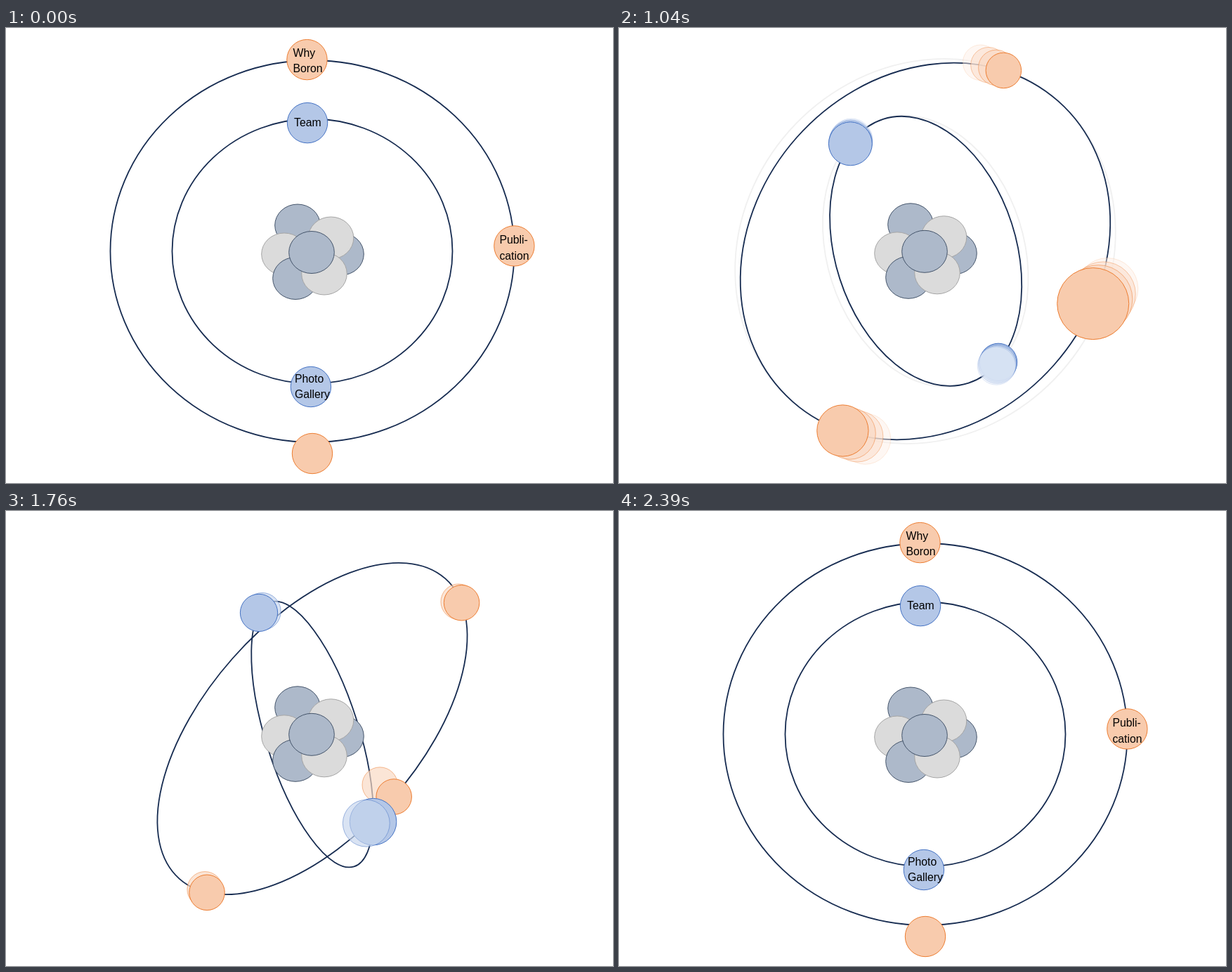
An HTML page with a canvas that plays this animation: 864 by 648 pixels, repeating every 8000 ms.

```html
<!DOCTYPE html>
<html lang="en">
<head>
<meta charset="utf-8">
<title>Atom menu</title>
<style>
  html, body { margin: 0; height: 100%; overflow: hidden; background: #fff; }
  canvas { display: block; width: 100vw; height: 100vh; }
</style>
</head>
<body>
<canvas id="stage" width="864" height="648"></canvas>
<script>
const ctx = document.getElementById('stage').getContext('2d');
const LOOP = 8000, START = 500, STEP = 90, LAST = 21, RAD = Math.PI / 180;
const ORANGE = ['#f8cbad', '#ed7d31'], BLUE = ['#b4c7e7', '#4472c4'];
const DARK = ['#adb9ca', '#44546a'], LIGHT = ['#dbdbdb', '#a5a5a5'];
const CX = 436, CY = 318, BALL = 28.7;

// Each ring flips about its long axis while its balls spin along it.
// turns: [step, degrees]; base: resting angle; nudge: resting offset in y
const outer = {
  rx: 287.5, ry: 272, axis: -48.5, bend: 0, shift: 68, rise: 8,
  spin: 42, pinch: 20, gain: 1.9, paint: ORANGE,
  turns: [[0, 0], [5, 18], [6, 26], [8, 70], [9, 84], [10, 220], [11, 227], [16, 355], [LAST, 360]],
  balls: [
    { base: -91.5, nudge: -1, lines: ['Why', 'Boron'], dx: -20, dy: -4.5 },
    { base: 90, nudge: 16, lines: [] },
    { base: -1.6, nudge: 0, lines: ['Publi-', 'cation'], dx: -21, dy: -3 }
  ]
};
const inner = {
  rx: 199.5, ry: 188.5, axis: 72.5, bend: -10, shift: 16, rise: 0,
  spin: -47, pinch: -17, gain: .25, paint: BLUE,
  turns: [[0, 0], [5, 42], [6, 47], [8, 62], [9, 81.5], [10, 226], [11, 233], [16, 329], [LAST, 360]],
  balls: [
    { base: -92, nudge: 5.5, lines: ['Team'], dx: -19, dy: 5 },
    { base: 90.6, nudge: 4.5, lines: ['Photo', 'Gallery'], dx: -23, dy: -6 }
  ]
};
const rings = [outer, inner];

const nucleus = [
  [477, 322, DARK], [415, 281, DARK], [396, 322, LIGHT], [462.5, 299, LIGHT],
  [412, 356.5, DARK], [453, 350, LIGHT], [435, 319.5, DARK]
];

function turnAt(turns, k) {
  k = Math.min(LAST, Math.max(0, k));
  const i = Math.max(1, turns.findIndex(([step]) => step >= k));
  const [k0, a] = turns[i - 1], [k1, b] = turns[i];
  return (a + (b - a) * (k - k0) / (k1 - k0)) * RAD;
}

// 1 at rest, 0 in motion
const restAt = k => Math.min(1, Math.max(0, 1 - .2 * (k + 1), 1 - .2 * (LAST - k)));

function ringPose(ring, k) {
  const turn = turnAt(ring.turns, k), sin = Math.sin(turn), cos = Math.cos(turn);
  const swing = Math.min(1, 10 * Math.abs(sin));
  const lean = Math.max(0, sin) ** 10;
  const tilt = (ring.axis * swing + ring.bend * lean) * RAD;
  return {
    x: CX + ring.shift * lean * Math.sin(tilt),
    y: CY - ring.shift * lean * Math.cos(tilt) - (sin < 0 ? ring.rise * swing : 0),
    a: ring.rx - 2 * swing, b: ring.ry * cos, tilt, sin, lean
  };
}

function ballPose(ring, ball, k) {
  const { x, y, a, b, tilt, sin } = ringPose(ring, k);
  let angle = ball.base * RAD - tilt + ring.spin * RAD * Math.min(1, 1.2 * Math.abs(sin));
  angle += ring.pinch * RAD * Math.cos(angle) * Math.max(0, -sin);
  const u = a * Math.cos(angle), v = b * Math.sin(angle);
  const depth = Math.sin(angle) * sin;
  return {
    x: x + u * Math.cos(tilt) - v * Math.sin(tilt),
    y: y + u * Math.sin(tilt) + v * Math.cos(tilt) + ball.nudge * Math.min(1, restAt(k) * 1.25),
    r: BALL * Math.max(.88, 1 + ring.gain * depth),
    depth
  };
}

function oval(x, y, rx, ry, [fill, line]) {
  ctx.beginPath();
  ctx.ellipse(x, y, rx, ry, 0, 0, 2 * Math.PI);
  ctx.fillStyle = fill;
  ctx.fill();
  ctx.strokeStyle = line;
  ctx.lineWidth = 1;
  ctx.stroke();
}

function strokeRing({ x, y, a, b, tilt }, color, width, end = 2 * Math.PI) {
  ctx.beginPath();
  ctx.ellipse(x, y, a, Math.abs(b), tilt, 0, end);
  ctx.strokeStyle = color;
  ctx.lineWidth = width;
  ctx.stroke();
}

function drawRings(k, moving) {
  const trail = (ago, color) =>
    rings.forEach(ring => strokeRing(ringPose(ring, k - ago), color, 1.8));
  if (moving && k <= 11) {
    trail(1, '#f0f0f0');
    if (k > 8) trail(.75, '#ccc');
  }
  trail(0, '#172c51');
  // The near half thickens when the ring is seen edge-on
  const front = ringPose(outer, k);
  if (front.lean > .9) strokeRing(front, '#000', 4, Math.PI);
}

function drawBall(ring, ball, k, moving) {
  const poses = [];
  const add = (ago, alpha) => poses.push({ ...ballPose(ring, ball, k - ago), alpha });
  if (moving && k > 11) add(.25, .5);
  else if (moving) [.15, .38, .5].forEach((alpha, i) => add(1 - i / 3, alpha));
  add(0, 1);
  // Larger poses are nearer to the viewer
  poses.sort((p, q) => p.r - q.r);
  for (const { x, y, r, alpha } of poses) {
    if (alpha < 1) {
      ctx.globalAlpha = .35;
      oval(x, y, r, r, ['#fff', 'transparent']);
    }
    ctx.globalAlpha = alpha;
    oval(x, y, r, r, ring.paint);
  }
  ctx.globalAlpha = 1;
}

function drawLabel({ x, y }, { lines, dx, dy }, k) {
  ctx.globalAlpha = restAt(k);
  ctx.fillStyle = '#000';
  ctx.font = '15.8px "Liberation Sans", Arial, sans-serif';
  lines.forEach((line, i) => ctx.fillText(line, x + dx, y + dy + 22.5 * i));
  ctx.globalAlpha = 1;
}

function draw(now) {
  const k = Math.min(LAST, Math.max(-1, Math.floor((now % LOOP - START) / STEP)));
  const moving = k > 0 && k < LAST;
  const items = rings.flatMap(ring =>
    ring.balls.map(ball => ({ ring, ball, pose: ballPose(ring, ball, k) })));
  const drawBalls = inFront => items
    .filter(({ pose }) => (pose.depth >= 0) === inFront)
    .forEach(({ ring, ball, pose }) => {
      drawBall(ring, ball, k, moving);
      drawLabel(pose, ball, k);
    });

  ctx.fillStyle = '#fff';
  ctx.fillRect(0, 0, 864, 648);
  drawRings(k, moving);
  drawBalls(false);
  nucleus.forEach(([x, y, paint]) => oval(x, y - (moving ? 1.2 : 0), 32.3, 30, paint));
  drawBalls(true);
  requestAnimationFrame(() => draw(performance.now()));
}
draw(performance.now());
</script>
</body>
</html>
```
